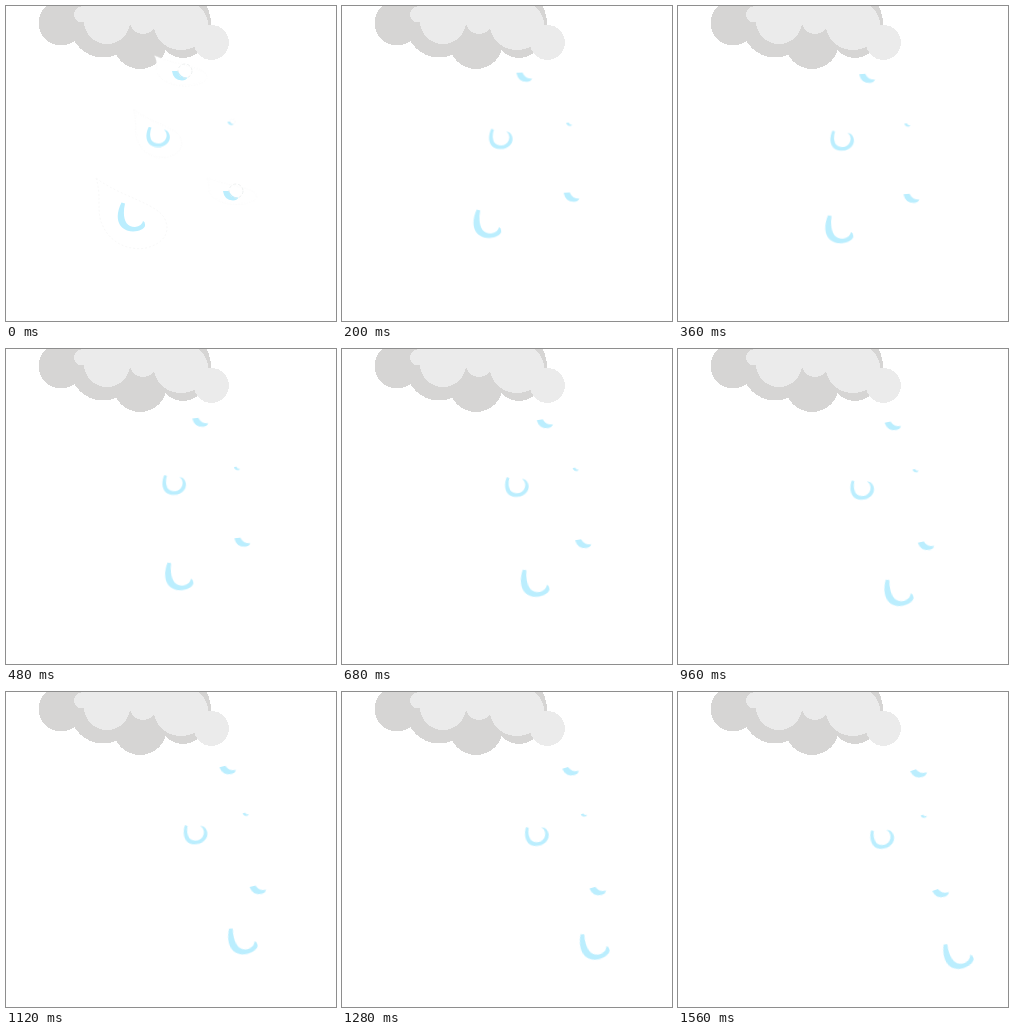
Recreate the animation shown at these times as an HTML page without scripts. Size 330 by 315 pixels, loop 1.6 s.

```html
<!DOCTYPE html>
<html lang="en">
<head>
<meta charset="utf-8">
<title>Cloud and drops</title>
<style>
  html, body { margin: 0; width: 100%; height: 100%; overflow: hidden; background: #fff; }
  svg { display: block; width: 330px; height: 315px; }
  .dark { fill: #d6d5d4; }
  .light { fill: #ebebeb; }
  .drop { fill: #bbeefe; animation: drift 1600ms steps(40) infinite; }
  .body { fill: #fff; stroke: #f6f6f6; stroke-width: .8; stroke-dasharray: 2 2; }
  .glint { fill: none; stroke: #e9eced; stroke-width: .8; stroke-dasharray: 3 2; }
  .body, .glint { animation: flash 1600ms step-end infinite; }
  @keyframes drift {
    from { transform: translate(0, 0) rotate(0deg); }
    to { transform: translate(var(--x), var(--y)) rotate(var(--turn)); }
  }
  @keyframes flash {
    0% { opacity: 1; }
    2.5%, 100% { opacity: 0; }
  }
</style>
</head>
<body>
<svg viewBox="0 0 330 315">
  <defs>
    <path id="body" class="body" d="M-36-38C-30-20-36-5-30 8C-22 28-2 35 14 32C30 28 38 18 34 6C30-12-10-18-36-38Z"/>
    <g id="small">
      <path d="M-9-1Q-8 8 1 8.5Q5 8.5 6.5 5.5Q0 6-3-1Z"/>
      <circle class="glint" cx="4" cy="-1" r="7"/>
    </g>
  </defs>

  <g shape-rendering="crispEdges">
    <g class="dark">
      <rect x="60" width="130" height="34"/>
      <circle cx="55" cy="17" r="22.5"/>
      <circle cx="97" cy="18.5" r="33"/>
      <circle cx="134" cy="36" r="27"/>
      <ellipse cx="177" cy="18" rx="28" ry="34"/>
    </g>
    <g class="light">
      <rect x="75" width="105" height="16"/>
      <circle cx="76" cy="8.5" r="8"/>
      <circle cx="101" cy="15" r="23"/>
      <circle cx="137" cy="15" r="13"/>
      <ellipse cx="175" cy="19" rx="27" ry="25"/>
      <circle cx="205.5" cy="36.5" r="17.5"/>
    </g>
  </g>

  <g transform="translate(175 66)">
    <g class="drop" style="--x:67.7px;--y:11.5px;--turn:-20deg">
      <use href="#body" transform="scale(.74 .43)"/>
      <use href="#small"/>
    </g>
  </g>
  <g transform="translate(225 116)">
    <g class="drop" style="--x:21.5px;--y:7px;--turn:-20deg">
      <use href="#small" transform="scale(.38)"/>
    </g>
  </g>
  <g transform="translate(152 129.5)">
    <g class="drop" style="--x:53.3px;--y:16px;--turn:-14deg">
      <use href="#body" transform="scale(.68)"/>
      <path d="M-9-9C-14 0-12 11.5-1 11.5C9 12 14 4 11-2Q10-5 6-6Q10-2 8 3C5 10-4 9-7 4Q-9-2-6.5-8Z"/>
    </g>
  </g>
  <g transform="translate(226 186)">
    <g class="drop" style="--x:38px;--y:11.3px;--turn:-20deg">
      <use href="#body" transform="scale(.7 .38)"/>
      <use href="#small"/>
    </g>
  </g>
  <g transform="translate(126 210)">
    <g class="drop" style="--x:158px;--y:53px;--turn:-20deg">
      <use href="#body"/>
      <path d="M-10.5-13.5C-16-3-16.5 10-5 14.5C3 17 12 14 13 10Q13.5 6 11 5Q10 10 3 11C-7 11-10 1-7-12.5Z"/>
    </g>
  </g>
</svg>
</body>
</html>
```
